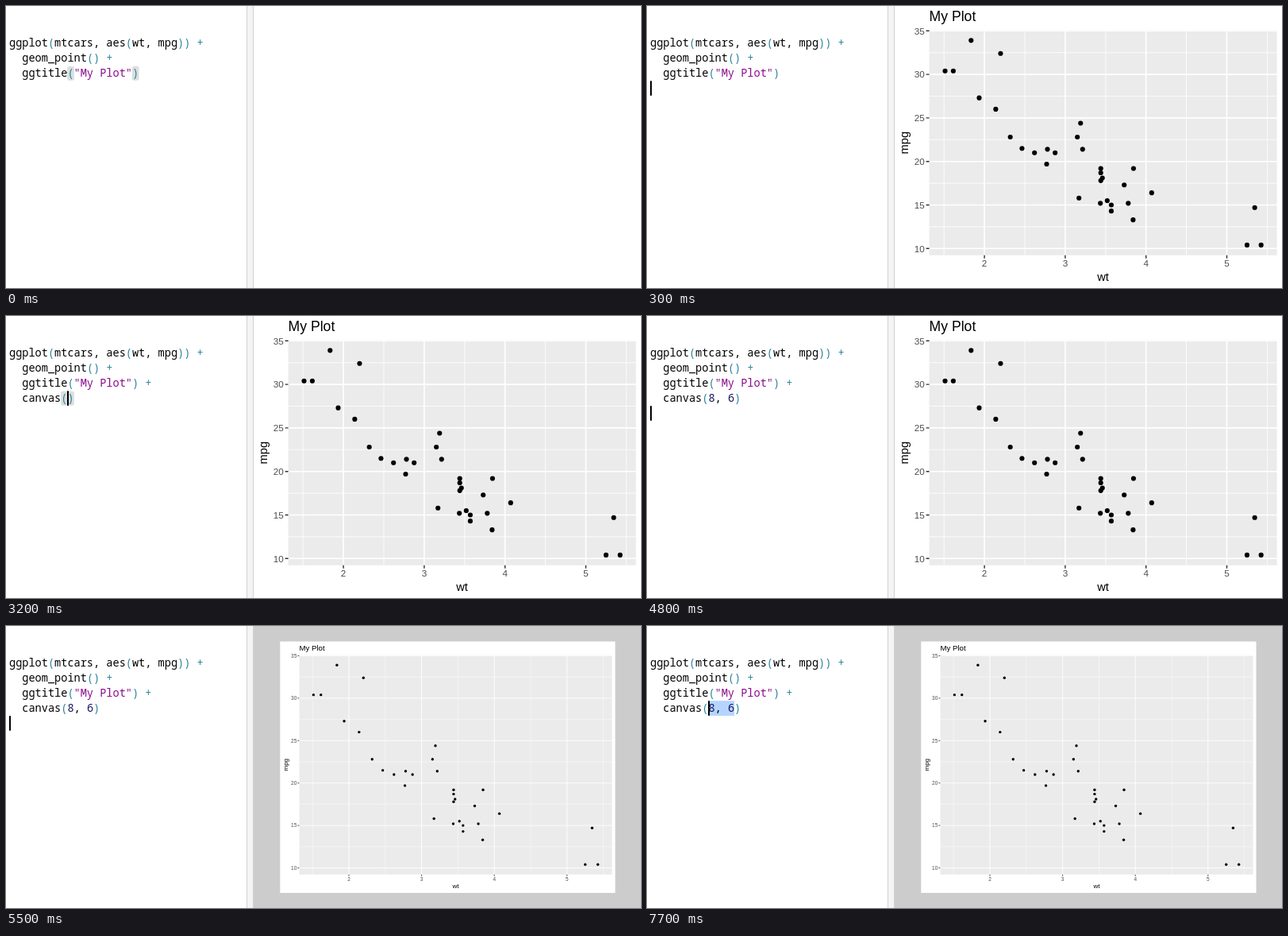
An HTML page that plays this animation: 800 px wide and 355 px high, repeating every 8000 ms.

```html
<!DOCTYPE html>
<html lang="en">
<head>
<meta charset="utf-8">
<title>Plot canvas</title>
<style>
html, body { margin: 0; width: 100%; height: 100%; overflow: hidden; background: #fff; }
svg { display: block; width: 800px; height: 355px; }
.code text { font: 13.6px "Noto Sans Mono", "DejaVu Sans Mono", monospace; white-space: pre; font-variant-ligatures: none; }
.plot { font-family: "Liberation Sans", Arial, sans-serif; }
.op { fill: #2b849c; }
.str { fill: #8b0a8b; }
.num { fill: #14145f; }
</style>
</head>
<body>
<svg viewBox="0 0 800 355">
  <g id="small" class="plot"></g>
  <g id="large" class="plot"></g>
  <rect x="303" width="9" height="355" fill="#f4f4f4"/>
  <path d="M303.5 0V355M311.5 0V355" stroke="#d2d2d2"/>
  <g class="code">
    <g id="marks"></g>
    <g id="lines"></g>
    <rect id="caret" width="2" height="18.5"/>
  </g>
</svg>
<script>
const LOOP = 8000, COL = 8.16, ROW = 18.9, LEFT = 4, TOP = 37.4;
const NS = "http://www.w3.org/2000/svg";
const $ = id => document.getElementById(id);

function add(parent, tag, attrs, text) {
  const el = document.createElementNS(NS, tag);
  for (const key in attrs) el.setAttribute(key, attrs[key]);
  if (text !== undefined) el.textContent = text;
  parent.appendChild(el);
  return el;
}

// mtcars: weight and miles per gallon
const WT = [2.62, 2.875, 2.32, 3.215, 3.44, 3.46, 3.57, 3.19, 3.15, 3.44, 3.44, 4.07, 3.73, 3.78, 5.25, 5.424,
  5.345, 2.2, 1.615, 1.835, 2.465, 3.52, 3.435, 3.84, 3.845, 1.935, 2.14, 1.513, 3.17, 2.77, 3.57, 2.78];
const MPG = [21, 21, 22.8, 21.4, 18.7, 18.1, 14.3, 24.4, 22.8, 19.2, 17.8, 16.4, 17.3, 15.2, 10.4, 10.4,
  14.7, 32.4, 30.4, 33.9, 21.5, 15.5, 15.2, 13.3, 19.2, 27.3, 26, 30.4, 15.8, 19.7, 15, 21.4];

// k scales type and strokes; x2 and y10 locate wt = 2 and mpg = 10
function drawPlot(g, { k, x2, sx, y10, sy }) {
  const px = v => x2 + (v - 2) * sx, py = v => y10 - (v - 10) * sy;
  const l = px(1.3175), r = px(5.6195), t = py(35.075), b = py(9.225);
  const path = (d, stroke, width) => add(g, "path", { d, stroke, "stroke-width": width * k });
  const label = (x, y, size, text, more) =>
    add(g, "text", { x, y, "font-size": size * k, "text-anchor": "middle", ...more }, text);
  const vert = x => `M${px(x)} ${t}V${b}`, horiz = y => `M${l} ${py(y)}H${r}`;
  const xs = [2, 3, 4, 5], ys = [10, 15, 20, 25, 30, 35];

  add(g, "rect", { x: l, y: t, width: r - l, height: b - t, fill: "#ebebeb" });
  path([1.5, 2.5, 3.5, 4.5, 5.5].map(vert).join("") + [12.5, 17.5, 22.5, 27.5, 32.5].map(horiz).join(""), "#fff", .8);
  path(xs.map(vert).join("") + ys.map(horiz).join(""), "#fff", 1.6);
  path(xs.map(x => `M${px(x)} ${b}v${4 * k}`).join("") + ys.map(y => `M${l} ${py(y)}h${-4 * k}`).join(""), "#333", 1.42);
  WT.forEach((w, i) => add(g, "circle", { cx: px(w), cy: py(MPG[i]), r: 3.07 * k }));

  for (const x of xs) label(px(x), b + 14.6 * k, 11.73, x, { fill: "#4d4d4d" });
  for (const y of ys) label(l - 5.8 * k, py(y) + 4.2 * k, 11.73, y, { fill: "#4d4d4d", "text-anchor": "end" });
  label(l, t - 11.2 * k, 17.6, "My Plot", { "text-anchor": "start" });
  label((l + r) / 2, b + 32.2 * k, 14.67, "wt");
  label(0, 0, 14.67, "mpg", { transform: `translate(${l - 26.5 * k} ${(t + b) / 2}) rotate(-90)` });
}

drawPlot($("large"), { k: 1, x2: 425.1, sx: 101.8, y10: 305.3, sy: 10.96 });
add($("small"), "rect", { x: 312, width: 488, height: 355, fill: "#ccc" });
add($("small"), "rect", { x: 345.3, y: 19.5, width: 422.2, height: 316.5, fill: "#fff" });
drawPlot($("small"), { k: .5495, x2: 432, sx: 91.6, y10: 304.5, sy: 10.68 });

function paint(el, code) {
  el.textContent = "";
  for (const part of code.match(/"[^"]*"|[()+]|\d+|[^"()+\d]+/g) || []) {
    const kind = /^"/.test(part) ? "str" : /^[()+]/.test(part) ? "op" : /^\d/.test(part) ? "num" : "";
    add(el, "tspan", { class: kind }, part);
  }
}

const colX = c => LEFT + c * COL, rowY = r => TOP + r * ROW;
const rows = [0, 1, 2, 3].map(r => add($("lines"), "text", { x: LEFT, y: rowY(r) + 13.6 }));
paint(rows[0], "ggplot(mtcars, aes(wt, mpg)) +");
paint(rows[1], "  geom_point() +");

const TITLE = '  ggtitle("My Plot")';
const titlePair = [[2, 9], [2, 19]];

// Each step changes only the named parts of the state.
// caret: [row, col] or null; pair: bracket cells; sel: [from, to] in row 3
const STEPS = [
  [0, { plot: "", title: TITLE, last: "", caret: null, pair: titlePair, sel: null }],
  [100, { plot: "large" }],
  [200, { caret: [3, 0] }],
  [300, { pair: [] }],
  [700, { caret: [2, 20], pair: titlePair }],
  [1100, { caret: [2, 21] }],
  [1400, { title: TITLE + " +", caret: [2, 22] }],
  [1700, { caret: [3, 2], pair: [] }],
  ...[2000, 2100, 2200, 2400, 2500, 2600].map((t, i) =>
    [t, { last: "  " + "canvas".slice(0, i + 1), caret: [3, i + 3] }]),
  [3200, { last: "  canvas()", caret: [3, 9], pair: [[3, 8], [3, 9]] }],
  [3800, { last: "  canvas(8)", caret: [3, 10], pair: [[3, 8]] }],
  [4000, { last: "  canvas(8,)", caret: [3, 11] }],
  [4100, { last: "  canvas(8, )", caret: [3, 12] }],
  [4600, { last: "  canvas(8, 6)", caret: [3, 13] }],
  [4700, { pair: [] }],
  [4800, { caret: [4, 0] }],
  [5400, { plot: "" }],
  [5500, { plot: "small" }],
  [5800, { caret: null }],
  [6200, { caret: [4, 0] }],
  [6500, { caret: [3, 14] }],
  [6700, { caret: [3, 13], pair: [[3, 8], [3, 13]] }],
  [7000, { caret: [3, 12], pair: [], sel: [12, 13] }],
  [7200, { caret: [3, 11], sel: [11, 13] }],
  [7400, { caret: [3, 10], sel: [10, 13] }],
  [7600, { caret: [3, 9], sel: [9, 13] }],
];

let shown = -1;
function show(index) {
  if (index === shown) return;
  shown = index;
  const s = Object.assign({}, ...STEPS.slice(0, index + 1).map(step => step[1]));
  for (const id of ["large", "small"]) $(id).style.display = s.plot === id ? "" : "none";
  paint(rows[2], s.title);
  paint(rows[3], s.last);

  const marks = $("marks");
  marks.textContent = "";
  for (const [r, c] of s.pair)
    add(marks, "rect", { x: colX(c) - .3, y: rowY(r) + .6, width: COL + .6, height: 18, rx: 2.5, fill: "#dcdfdf" });
  if (s.sel)
    add(marks, "rect", { x: colX(s.sel[0]), y: rowY(3), width: (s.sel[1] - s.sel[0]) * COL, height: ROW, fill: "#b5d5ff" });

  const caret = $("caret");
  caret.style.display = s.caret ? "" : "none";
  if (s.caret) {
    caret.setAttribute("x", Math.round(colX(s.caret[1])));
    caret.setAttribute("y", rowY(s.caret[0]) + .2);
  }
}

function frame() {
  const t = performance.now() % LOOP;
  show(STEPS.findLastIndex(step => step[0] <= t));
  requestAnimationFrame(frame);
}
frame();
</script>
</body>
</html>
```
